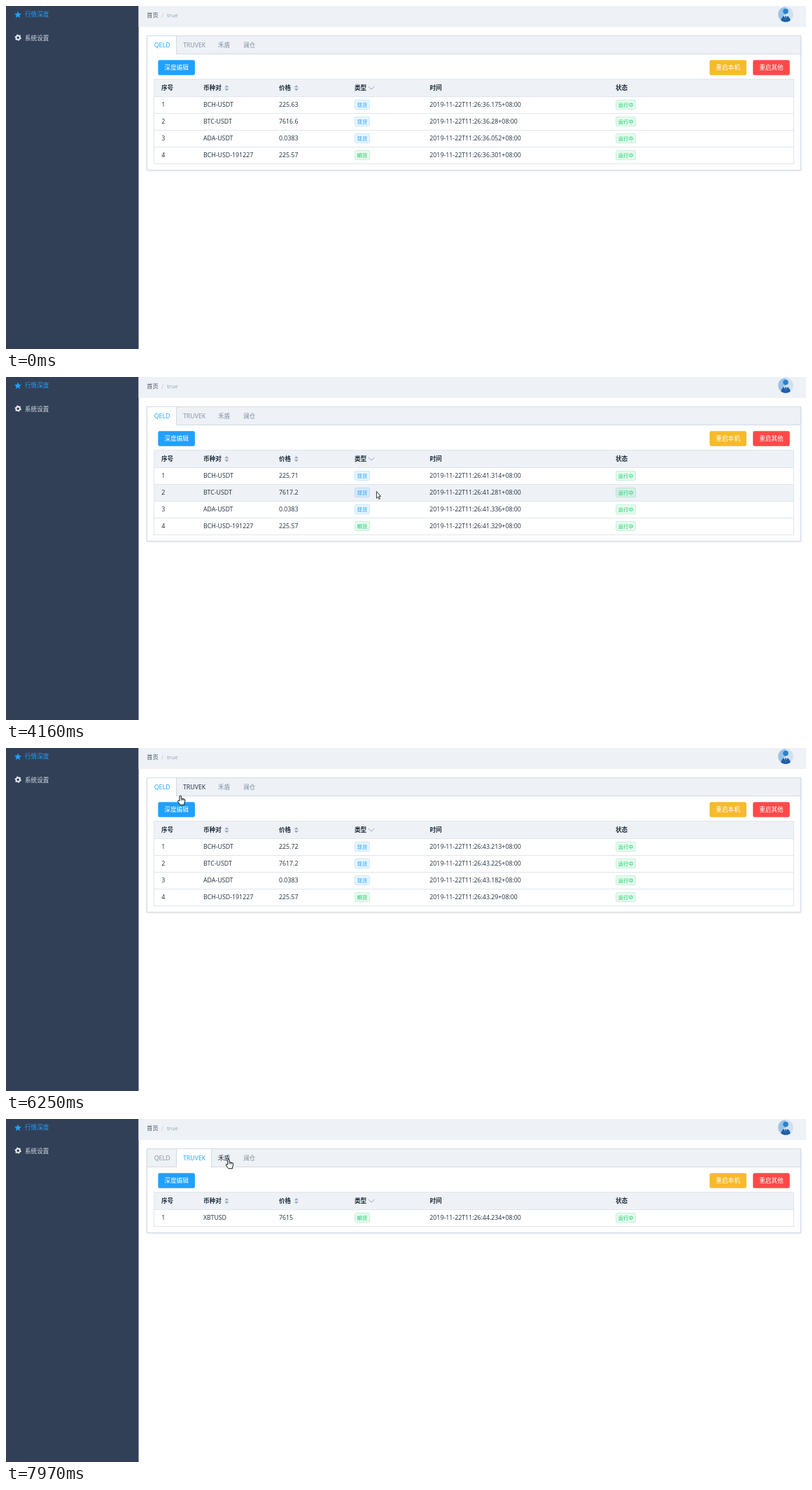
Write an HTML page with a canvas that moves like this. It is 1143x490 px and loops after 8000 ms.

```html
<!DOCTYPE html>
<html lang="zh-CN">
<head>
<meta charset="utf-8">
<title>行情深度</title>
<style>
html, body { margin: 0; width: 100%; height: 100%; overflow: hidden; background: #fff; }
canvas { display: block; width: 1143px; height: 490px; }
</style>
</head>
<body>
<canvas id="stage"></canvas>
<script>
const W = 1143, H = 490, LOOP = 8000, STEP = 77.2;
const canvas = document.getElementById('stage');
const ratio = window.devicePixelRatio || 1;
canvas.width = W * ratio;
canvas.height = H * ratio;
const c = canvas.getContext('2d');

const FONT = '"Open Sans", "Noto Sans", "Noto Sans CJK SC", "Noto Sans CJK", sans-serif';
const BLUE = '#20a0ff', INK = '#1f2d3d', GREY = '#8391a5', PALE = '#eef1f6', EDGE = '#d1dbe5', LINE = '#dfe6ec';

const TABS = [
  { name: 'QELD', x: 202, w: 42, tx: 211.7 },
  { name: 'TRUVEK', x: 244, w: 50, tx: 253 },
  { name: '禾盾', x: 294, w: 36, tx: 303 },
  { name: '澜仓', x: 330, w: 36, tx: 339 }
];
const PAIRS = ['BCH-USDT', 'BTC-USDT', 'ADA-USDT', 'BCH-USD-191227'];
const CLICK = 6700, SWAP = 6925;

// start time, first price, second price, then clock values per row
const UPDATES = [
  [0, '225.63', '7616.6', '36.175', '36.28', '36.052', '36.301'],
  [130, '225.63', '7616.6', '37.218', '37.196', '37.143', '37.265'],
  [1070, '225.7', '7616.6', '38.179', '38.173', '38.287', '38.249'],
  [2060, '225.72', '7616.6', '39.188', '39.188', '39.121', '39.294'],
  [3080, '225.71', '7617.2', '40.236', '40.254', '40.172', '40.318'],
  [4160, '225.71', '7617.2', '41.314', '41.281', '41.336', '41.329'],
  [5090, '225.71', '7617.2', '42.187', '42.159', '42.264', '42.257'],
  [6010, '225.72', '7617.2', '43.213', '43.225', '43.182', '43.29']
];

// pointer tip: time, x, y
const PATH = [
  [1590, 979, 447], [1670, 850, 354], [1750, 690, 262], [1820, 585, 208],
  [2050, 575, 204], [2210, 542, 180], [2430, 529, 163], [4380, 529, 163],
  [4460, 512, 145], [4610, 430, 99], [4770, 355, 90], [4930, 290, 87],
  [5090, 265, 88], [5370, 257, 96], [5460, 257, 96], [5530, 252, 95],
  [5690, 244, 87], [6080, 244, 87], [6150, 246, 79], [6300, 252, 57],
  [6460, 255, 47], [7080, 255, 47], [7150, 258, 53], [7300, 278, 72],
  [7450, 318, 68], [7540, 347, 62], [7700, 345, 59], [7850, 318, 57], [8000, 318, 57]
];

function pointer(t) {
  if (t < PATH[0][0]) return null;
  let i = 0;
  while (i < PATH.length - 2 && t >= PATH[i + 1][0]) i++;
  const [t0, x0, y0] = PATH[i], [t1, x1, y1] = PATH[i + 1];
  const k = Math.min(1, (t - t0) / (t1 - t0));
  return { x: x0 + (x1 - x0) * k, y: y0 + (y1 - y0) * k };
}

const inside = (p, x, y, w, h) => !!p && p.x >= x && p.x < x + w && p.y >= y && p.y < y + h;

function mix(a, b, k) {
  const ch = (s, i) => parseInt(s.slice(i, i + 2), 16);
  return 'rgb(' + [1, 3, 5].map(i => Math.round(ch(a, i) + (ch(b, i) - ch(a, i)) * k)).join(',') + ')';
}

function rect(x, y, w, h, fill) {
  c.fillStyle = fill;
  c.fillRect(x, y, w, h);
}

function text(s, x, cy, color, size = 8.8, weight = 400) {
  c.font = `${weight} ${size}px ${FONT}`;
  c.fillStyle = color;
  c.fillText(s, x, cy + size * 0.365);
}

function round(x, y, w, h, r, fill, stroke) {
  c.beginPath();
  c.roundRect(x, y, w, h, r);
  c.fillStyle = fill;
  c.fill();
  if (stroke) {
    c.lineWidth = 1;
    c.strokeStyle = stroke;
    c.stroke();
  }
}

function poly(points, fill, stroke, width = 1) {
  c.beginPath();
  points.forEach(([x, y]) => c.lineTo(x, y));
  if (fill) {
    c.closePath();
    c.fillStyle = fill;
    c.fill();
  }
  if (stroke) {
    c.lineWidth = width;
    c.strokeStyle = stroke;
    c.stroke();
  }
}

function disc(x, y, r, fill) {
  c.beginPath();
  c.arc(x, y, r, 0, Math.PI * 2);
  c.fillStyle = fill;
  c.fill();
}

function sidebar() {
  rect(0, 0, 189.5, H, '#324057');
  const star = [];
  for (let i = 0; i < 10; i++) {
    const a = i * Math.PI / 5 - Math.PI / 2, r = i % 2 ? 2.4 : 5.2;
    star.push([17 + r * Math.cos(a), 12.7 + r * Math.sin(a)]);
  }
  poly(star, BLUE);
  text('行情深度', 27, 12.3, BLUE, 8.6);

  const gear = [];
  for (let i = 0; i < 24; i++) {
    const a = (i + 0.5) * Math.PI / 12, r = i % 4 < 2 ? 4.7 : 3.7;
    gear.push([17.2 + r * Math.cos(a), 45.2 + r * Math.sin(a)]);
  }
  poly(gear, '#e5eaf1');
  disc(17.2, 45.2, 1.7, '#324057');
  text('系统设置', 27, 45.5, '#d3dce6', 8.6);
}

function avatar() {
  c.save();
  c.beginPath();
  c.arc(1114, 12, 10.8, 0, Math.PI * 2);
  c.clip();
  rect(1103, 1, 11, 22, '#9ac3e6');
  rect(1114, 1, 11, 22, '#cfe0ef');
  c.beginPath();
  c.ellipse(1114, 22, 6.8, 8.6, 0, 0, Math.PI * 2);
  c.fillStyle = '#1c5ea8';
  c.fill();
  poly([[1111.3, 13], [1116.7, 13], [1114, 20]], '#e8f2fb');
  poly([[1113.3, 14], [1114.7, 14], [1115, 18], [1114, 20], [1113, 18]], '#1c5ea8');
  disc(1114, 7.6, 3.8, '#2a80cc');
  c.restore();
}

function topbar() {
  rect(189.5, 0, W - 189.5, 30, PALE);
  text('首页', 201.3, 13.5, '#48576a', 8.1, 500);
  text('/', 222, 13.5, '#bfcbd9', 8.3);
  text('true', 230, 13.3, '#8fa3ba', 8);
  avatar();
}

function card(bottom) {
  c.save();
  c.shadowColor = 'rgba(0,0,0,.14)';
  c.shadowBlur = 2.8 * ratio;
  c.shadowOffsetY = 1.2 * ratio;
  rect(201.3, 42.3, 934.4, bottom - 41.6, '#fff');
  c.restore();
  c.lineWidth = 1;
  c.strokeStyle = EDGE;
  c.strokeRect(201.5, 42.5, 934, bottom - 42);
}

function tabBar(t, p) {
  rect(202, 43, 933, 25, PALE);
  rect(202, 68, 933, 1, EDGE);
  const active = t < CLICK ? 0 : 1;
  const k = Math.max(0, Math.min(1, (t - CLICK) / 300));
  TABS.forEach((tab, i) => {
    let color = inside(p, tab.x, 43, tab.w, 25) ? INK : GREY;
    if (i === active) {
      rect(tab.x, 43, tab.w, 26, '#fff');
      if (i) rect(tab.x - 1, 43, 1, 26, EDGE);
      rect(tab.x + tab.w - 1, 43, 1, 26, EDGE);
      color = i ? mix(INK, BLUE, k) : BLUE;
    } else if (i === 0) {
      rect(tab.x, 43, tab.w - 1, 25, mix('#ffffff', PALE, k));
      color = mix(BLUE, GREY, k);
    }
    text(tab.name, tab.tx, 55.8, color, i < 2 ? 8.8 : 8.6);
  });
}

function button(label, x, fill) {
  round(x, 77.3, 52.6, 21.5, 2.4, fill);
  text(label, x + 9, 88.2, '#fff', 8.65, 500);
}

function tag(label, x, cy, w, rgb) {
  round(x + 0.5, cy - 6.7, w - 1, 13.4, 2.3, `rgba(${rgb},.1)`, `rgba(${rgb},.2)`);
  text(label, x + 3.5, cy + 0.2, `rgb(${rgb})`, 7.4);
}

function sorter(x) {
  poly([[x - 3, 116.2], [x, 113], [x + 3, 116.2]], '#97a8be');
  poly([[x - 3, 118], [x, 121.2], [x + 3, 118]], '#97a8be');
}

function tableRows(t) {
  if (t >= SWAP) return [['XBTUSD', '7615', '44.234', true]];
  const u = UPDATES.filter(v => v[0] <= t).pop();
  const prices = [u[1], u[2], '0.0383', '225.57'];
  return PAIRS.map((pair, i) => [pair, prices[i], u[3 + i], i === 3]);
}

function table(rows, p) {
  const bottom = 129 + rows.length * 24;
  rect(212, 105, 913, 24, PALE);
  [['序号', 222], ['币种对', 282], ['价格', 390], ['类型', 498], ['时间', 605.5], ['状态', 871]]
    .forEach(([s, x]) => text(s, x, 117, INK, 8.6, 700));
  sorter(315.3);
  sorter(414.8);
  poly([[517.5, 115], [522, 119], [526.3, 115]], null, '#97a8be', 1);

  rows.forEach(([pair, price, clock, future], i) => {
    const y = 129 + i * 24, cy = y + 12;
    if (inside(p, 212, y, 913, 24)) rect(212, y, 913, 24, PALE);
    text(String(i + 1), 222.3, cy - 0.3, INK);
    text(pair, 282, cy - 0.3, INK);
    text(price, 390, cy - 0.3, INK);
    text(`2019-11-22T11:26:${clock}+08:00`, 605.3, cy - 0.3, INK);
    tag(future ? '期货' : '现货', 498, cy, 22, future ? '19,206,102' : '32,160,255');
    tag('运行中', 871, cy, 29, '19,206,102');
  });
  for (let y = 129; y <= bottom; y += 24) rect(211, y, 915, 1, LINE);
  c.lineWidth = 1;
  c.strokeStyle = LINE;
  c.strokeRect(211.5, 104.5, 914, bottom - 104);
}

function cursor(p, hand) {
  c.save();
  c.translate(p.x, p.y);
  c.lineJoin = 'round';
  if (hand) {
    c.beginPath();
    c.moveTo(-1.2, 8.2);
    c.lineTo(-1.2, 1.3);
    c.quadraticCurveTo(0, -0.5, 1.2, 1.3);
    c.lineTo(1.2, 4.8);
    c.lineTo(5.5, 5.6);
    c.quadraticCurveTo(6.9, 6, 6.7, 7.5);
    c.lineTo(5.7, 11.3);
    c.lineTo(5.4, 13.8);
    c.lineTo(-0.2, 13.8);
    c.lineTo(-3.9, 8.9);
    c.quadraticCurveTo(-3.6, 6.6, -1.2, 8.2);
    c.closePath();
    c.fillStyle = '#fff';
    c.fill();
    c.lineWidth = 1;
    c.strokeStyle = '#111';
    c.stroke();
    c.beginPath();
    [1.2, 3, 4.8].forEach(x => { c.moveTo(x, 5.2); c.lineTo(x, 7.6); });
    c.lineWidth = 0.7;
    c.stroke();
  } else {
    poly([[0.4, 0.5], [0.4, 10.2], [2.5, 8.2], [3.9, 11.4], [5.3, 10.8], [3.9, 7.7], [6.4, 7.5], [0.4, 0.5]],
      '#fff', '#222', 0.9);
  }
  c.restore();
}

function draw(t) {
  const st = t < 130 ? 0 : 130 + Math.floor((t - 130) / STEP) * STEP;
  const p = pointer(st);
  const rows = tableRows(t);
  const onButton = inside(p, 217, 77, 53, 22);
  const onTab = inside(p, 202, 43, 164, 25);

  c.setTransform(ratio, 0, 0, ratio, 0, 0);
  rect(0, 0, W, H, '#fff');
  sidebar();
  topbar();
  card(138 + rows.length * 24);
  tabBar(st, p);
  button('深度编辑', 217.3, onButton ? '#4db3ff' : BLUE);
  button('重启本机', 1005.3, '#f7ba2a');
  button('重启其他', 1067.2, '#ff4949');
  table(rows, p);
  if (p) cursor(p, onButton || onTab);
}

const start = performance.now();
function tick() {
  draw((performance.now() - start) % LOOP);
  requestAnimationFrame(tick);
}
tick();
</script>
</body>
</html>
```
